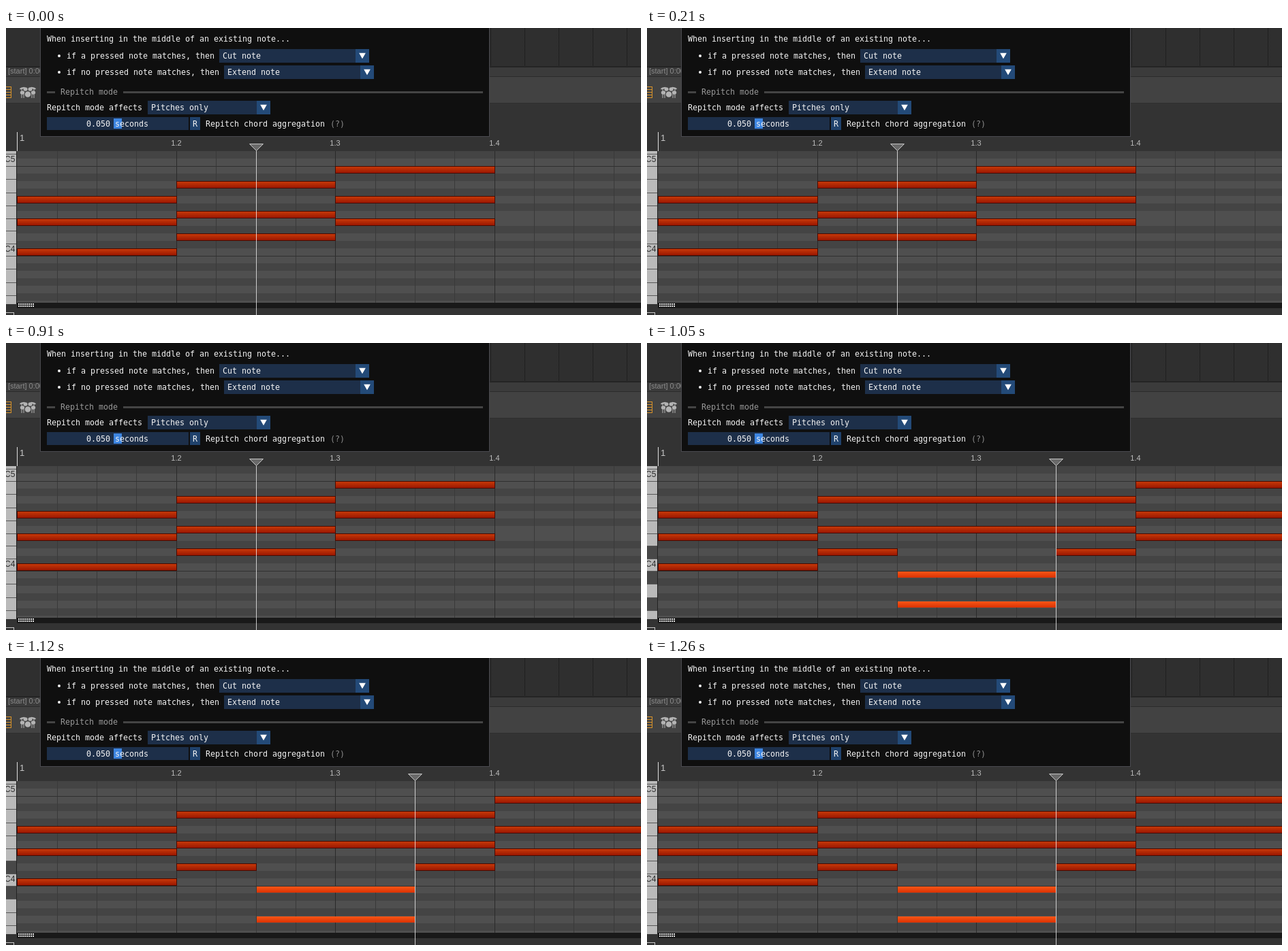
An HTML page with a canvas that plays this animation: 932x422 px, repeating every 3640 ms.

```html
<!DOCTYPE html>
<html lang="en">
<head>
<meta charset="utf-8">
<title>Piano roll repitch</title>
<style>
  html, body { margin: 0; width: 100%; height: 100%; overflow: hidden; background: #333; }
  canvas { display: block; width: 932px; height: 422px; }
</style>
</head>
<body>
<canvas id="stage" width="932" height="422"></canvas>
<script>
const ctx = document.getElementById('stage').getContext('2d');
const W = 932, H = 422, LOOP = 3640;
const MONO = '11.63px "DejaVu Sans Mono", monospace';
const SANS = '"Liberation Sans", Arial, sans-serif';

// Piano roll geometry: C4 sits on the row that ends at y = 335.
const ROLL_X = 16, ROLL_TOP = 181, ROLL_BOTTOM = 404;
const ROW = 11, OCTAVE = ROW * 12, C4_BOTTOM = 335;
const rowTop = pitch => C4_BOTTOM - (pitch - 59) * ROW;
const beatX = beat => Math.round(16.4 + beat * 233.4);

// Bottom edge of a white key counted from C4: C-E share 5 rows, F-B share 7.
function keyBottom(k) {
  const octave = Math.floor(k / 7), step = k - octave * 7;
  const rows = step < 3 ? step * 5 / 3 : 5 + (step - 3) * 7 / 4;
  return Math.round(C4_BOTTOM - octave * OCTAVE - rows * ROW);
}

// [start beat, end beat, pitch, selected]
const firstChord = [60, 64, 67].map(p => [0, 1, p]);
const before = [
  ...firstChord,
  ...[62, 65, 69].map(p => [1, 2, p]),
  ...[64, 67, 71].map(p => [2, 3, p])
];
const after = [
  ...firstChord,
  [1, 3, 69], [1, 3, 65], [1, 1.5, 62], [2.5, 3, 62],
  ...[64, 67, 71].map(p => [3, 4, p]),
  [1.5, 2.5, 59, true], [1.5, 2.5, 55, true]
];

// White keys counted from C4: D4 = 1, B3 = -1, G3 = -3
const PRESSED = '#956f2b', RELEASING = '#484848';
const steps = [
  { at: 0, notes: before, cursor: 1.5, keys: [] },
  { at: 980, notes: before, cursor: 1.5, keys: [1, -1, -3], tint: PRESSED },
  { at: 1050, notes: after, cursor: 2.5, keys: [1, -1, -3], tint: RELEASING },
  { at: 1120, notes: after, cursor: 2.5, keys: [1, -1], tint: RELEASING },
  { at: 1190, notes: after, cursor: 2.5, keys: [1], tint: RELEASING },
  { at: 1260, notes: after, cursor: 2.5, keys: [] }
];

function rect(x, y, w, h, color) {
  ctx.fillStyle = color;
  ctx.fillRect(x, y, w, h);
}

function text(str, x, y, color = '#f4f4f4', font = MONO, align = 'left') {
  ctx.font = font;
  ctx.textAlign = align;
  ctx.fillStyle = color;
  ctx.fillText(str, x, y);
}

function polygon(points, fill, stroke) {
  ctx.beginPath();
  points.forEach(([x, y]) => ctx.lineTo(x, y));
  ctx.closePath();
  ctx.fillStyle = fill;
  ctx.fill();
  if (stroke) {
    ctx.strokeStyle = stroke;
    ctx.lineWidth = 1;
    ctx.stroke();
  }
}

function disc(x, y, rx, ry, color, tilt = 0) {
  ctx.beginPath();
  ctx.ellipse(x, y, rx, ry, tilt, 0, Math.PI * 2);
  ctx.fillStyle = color;
  ctx.fill();
}

function drawIcons() {
  const amber = '#d8932a', light = '#b4b4b4', dark = '#3d3d3d';
  rect(7, 86, 1, 17, amber);
  for (let y = 86; y <= 102; y += 4) rect(0, y, 7, 1, amber);

  for (const side of [-1, 1]) {
    disc(32 + side * 8, 88.5, 4, 1.2, light, side * 0.3);
    disc(32 + side * 3.5, 90, 3, 2.8, light);
    disc(32 + side * 8, 95, 3.2, 2.8, light);
    rect(31.5 + side * 9, 89, 1, 14, light);
    rect(31.5 + side * 6, 97, 1, 6, light);
  }
  disc(32, 97.5, 5, 5, dark);
  disc(32, 97.5, 4.3, 4.3, light);
}

function drawBackdrop() {
  rect(0, 0, W, H, '#333');
  rect(0, 0, W, 56, '#2f2f2f');
  for (let x = 711; x < W; x += 50)
    for (let y = 0; y < 56; y += 2) rect(x, y, 1, 1, '#111');
  rect(0, 56, W, 2, '#242424');
  rect(0, 58, W, 13, '#3b3b3b');
  rect(0, 71, W, 1, '#2c2c2c');
  rect(0, 72, W, 38, '#424242');
  rect(0, 110, W, 1, '#2e2e2e');
  text('[start] 0:00', 3, 67, '#8c8c8c', '11px ' + SANS);
  drawIcons();
}

function drawCombo(x, y, w, label) {
  rect(x, y, w, 20, '#1d2f49');
  rect(x + w - 20, y, 20, 20, '#234a78');
  const cx = x + w - 10, cy = y + 10;
  polygon([[cx - 4.85, cy - 4.2], [cx + 4.85, cy - 4.2], [cx, cy + 4.2]], '#fff');
  text(label, x + 5, y + 14);
}

function drawPanel() {
  rect(50, 0, 660, 160, '#4b4b50');
  rect(51, 0, 658, 159, '#0f0f0f');
  text('When inserting in the middle of an existing note...', 60, 20);
  disc(78, 41, 2, 2, '#f4f4f4');
  text('if a pressed note matches, then', 89, 45);
  drawCombo(313, 31, 220, 'Cut note');
  disc(78, 65, 2, 2, '#f4f4f4');
  text('if no pressed note matches, then', 89, 69);
  drawCombo(320, 55, 220, 'Extend note');
  rect(60, 93, 12, 3, '#444');
  rect(172, 93, 528, 3, '#444');
  text('Repitch mode', 80, 98, '#999');
  text('Repitch mode affects', 60, 121);
  drawCombo(208, 107, 180, 'Pitches only');
  rect(60, 131, 208, 19, '#1d2f49');
  rect(158, 133, 12, 15, '#3d85e0');
  text('0.050 seconds', 118, 145);
  rect(270, 131, 15, 19, '#20426c');
  text('R', 274, 145);
  text('Repitch chord aggregation', 293, 145);
  text('(?)', 476, 145, '#8c8c8c');
}

function drawRuler() {
  rect(16, 153, 1, 28, '#ddd');
  text('1', 20, 166, '#c8c8c8', '13px ' + SANS);
  for (let beat = 1; beat < 4; beat++)
    text('1.' + (beat + 1), beatX(beat), 173, '#bcbcbc', '11px ' + SANS, 'center');
}

function drawGrid() {
  const blackKeys = [1, 3, 6, 8, 10];
  ctx.save();
  ctx.beginPath();
  ctx.rect(ROLL_X, ROLL_TOP, W - ROLL_X, ROLL_BOTTOM - ROLL_TOP);
  ctx.clip();
  for (let p = 53; p <= 73; p++)
    rect(ROLL_X, rowTop(p), W, ROW, blackKeys.includes(p % 12) ? '#444' : '#4f4f4f');
  for (let i = 1; i < 16; i++)
    rect(beatX(i / 4), ROLL_TOP, 1, ROLL_BOTTOM - ROLL_TOP, i % 4 ? '#393939' : '#2a2a2a');
  for (const y of [C4_BOTTOM - OCTAVE, C4_BOTTOM]) rect(ROLL_X, y, W, 1, '#303030');
  ctx.restore();
}

function drawKeyboard({ keys, tint }) {
  rect(0, ROLL_TOP, 15, 225, '#bababa');
  for (let k = -3; k <= 8; k++) {
    const bottom = keyBottom(k), top = keyBottom(k + 1);
    if (keys.includes(k)) rect(0, top, 15, bottom - top, tint);
    if (bottom > ROLL_TOP) rect(0, bottom, 15, 1, '#585858');
  }
  rect(15, ROLL_TOP, 1, 225, '#222');
  text('C5', -2, 197, '#2d2d2d', '12px ' + SANS);
  text('C4', -2, 329, '#2d2d2d', '12px ' + SANS);
}

function drawNote([start, end, pitch, selected]) {
  const x = beatX(start), y = rowTop(pitch), w = beatX(end) - x;
  const fill = ctx.createLinearGradient(0, y, 0, y + ROW);
  fill.addColorStop(0, selected ? '#fc5a18' : '#cb3c0a');
  fill.addColorStop(1, selected ? '#d62e02' : '#971400');
  if (!selected) rect(x, y, w + 1, ROW, '#480a00');
  rect(x + 1, y + 1, w - 1, ROW - 2, fill);
}

function drawFooter() {
  rect(0, 406, W, 16, '#333');
  rect(ROLL_X, ROLL_BOTTOM, W - ROLL_X, 8, '#191919');
  for (let x = 18; x < 42; x += 3) {
    rect(x, 405, 2, 2, '#e4e4e4');
    rect(x, 408, 2, 2, '#e4e4e4');
  }
  rect(0, 418, 12, 1, '#c8c8c8');
  rect(11, 418, 1, 4, '#c8c8c8');
}

function drawCursor(beat) {
  const x = beatX(beat);
  rect(x, 180, 1, H - 180, 'rgba(255, 255, 255, 0.75)');
  polygon([[x - 9.5, 170.5], [x + 10.5, 170.5], [x + 0.5, 180.5]], '#6a6a6a', '#c4c4c4');
}

function draw(step) {
  drawBackdrop();
  drawRuler();
  drawGrid();
  drawKeyboard(step);
  step.notes.forEach(drawNote);
  drawFooter();
  drawCursor(step.cursor);
  drawPanel();
}

const startTime = performance.now();
let shown;
function tick() {
  const t = (performance.now() - startTime) % LOOP;
  const step = steps.findLast(s => s.at <= t);
  if (step !== shown) draw(shown = step);
  requestAnimationFrame(tick);
}
tick();
</script>
</body>
</html>
```
